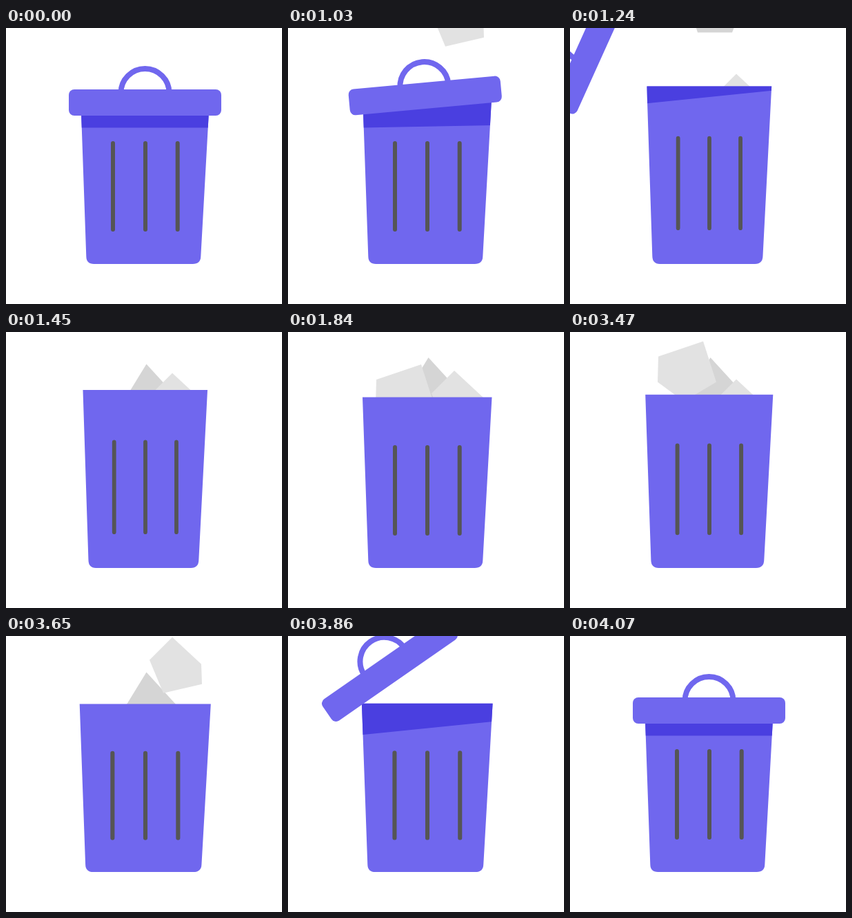
An HTML page for the animation above (4.1 s loop, 400 by 400 pixels).

```html
<!DOCTYPE html>
<html lang="en">
<head>
<meta charset="utf-8">
<title>Trash can</title>
<style>
  html, body { margin: 0; width: 100%; height: 100%; overflow: hidden; background: #fff; }
  svg { display: block; width: 100%; height: 100%; }
</style>
</head>
<body>
<svg viewBox="0 0 400 400">
  <defs>
    <path id="body" d="M108 94.5H295.5L282.3 331Q282 342 270.5 342H127.5Q116.5 342 116.3 331Z"/>
    <clipPath id="inside"><use href="#body"/></clipPath>
  </defs>
  <path id="back" fill="#d5d5d5" d="M203.5 37L171 90L185 135H235L252 90Z"/>
  <path id="left" fill="#e2e2e2" d="M128 69L193 47L212 106L165 134L127 106Z"/>
  <path id="right" fill="#e2e2e2" d="M241 56L208 89L228 137L284 124L283 95Z"/>
  <g id="bin">
    <use href="#body" fill="#7067ee"/>
    <path id="shadow" fill="#4a3fe0" clip-path="url(#inside)"/>
    <path d="M155 167V292M202 167V292M248.7 167V292" stroke="#555" stroke-width="6" stroke-linecap="round"/>
  </g>
  <g id="lid">
    <path d="M166.5 94a35 35 0 0 1 70 0" fill="none" stroke="#7067ee" stroke-width="8"/>
    <rect x="91" y="89" width="221" height="38" rx="8" fill="#7067ee"/>
  </g>
</svg>
<script>
const LOOP = 4100;
const el = id => document.getElementById(id);
const progress = (t, start, length) => Math.min(1, Math.max(0, (t - start) / length));

const backIn = p => p * p * (2.70158 * p - 1.70158);
const backOut = p => 1 - backIn(1 - p);
const lidEase = p => 1 - (1 - p) ** 2.4 * (1 + 1.75 * p);

// travel above the rest position, then start and length of the drop and of the exit
const papers = [
  { id: 'right', travel: 147, drop: [1000, 520], exit: [3360, 350] },
  { id: 'back', travel: 155, drop: [1220, 520], exit: [3503, 350] },
  { id: 'left', travel: 220, drop: [1425, 370], exit: [3213, 350] }
];

// time and vertical stretch of the bin
const wobble = [
  [0, 0], [1060, 0], [1150, -.035], [1250, .042], [1350, -.035], [1450, .042],
  [1580, -.037], [1710, .015], [1840, 0], [3200, 0], [3310, .042], [3410, -.037],
  [3510, .042], [3610, -.035], [3730, .042], [3840, -.015], [3930, 0], [LOOP, 0]
];

function stretchAt(t) {
  const i = wobble.findIndex(([time]) => time > t);
  const [t0, v0] = wobble[i - 1], [t1, v1] = wobble[i];
  return v0 + (v1 - v0) * (1 - Math.cos(Math.PI * (t - t0) / (t1 - t0))) / 2;
}

function draw(t) {
  for (const { id, travel, drop, exit } of papers) {
    const lift = 1 - backOut(progress(t, ...drop)) + backIn(progress(t, ...exit));
    el(id).setAttribute('transform', `translate(0 ${-travel * lift})`);
  }

  const stretch = stretchAt(t);
  el('bin').setAttribute('transform',
    `translate(201.7 342) scale(${1 - .88 * stretch} ${1 + stretch}) translate(-201.7 -342)`);

  const open = lidEase(progress(t, 1000, 400)) - lidEase(progress(t, 3680, 390));
  el('lid').setAttribute('transform', `translate(${-140 * open * open} 0) rotate(${-85 * open} 91 127)`);

  const rightEdge = Math.max(94, 144.5 - 57 * open);
  const leftEdge = Math.max(94, 144.5 - 57 * open ** 3);
  el('shadow').setAttribute('d', `M108 94H296V${rightEdge}L108 ${leftEdge}Z`);
}

let begin;
function tick(now) {
  begin ??= now;
  draw((now - begin) % LOOP);
  requestAnimationFrame(tick);
}
draw(0);
requestAnimationFrame(tick);
</script>
</body>
</html>
```
